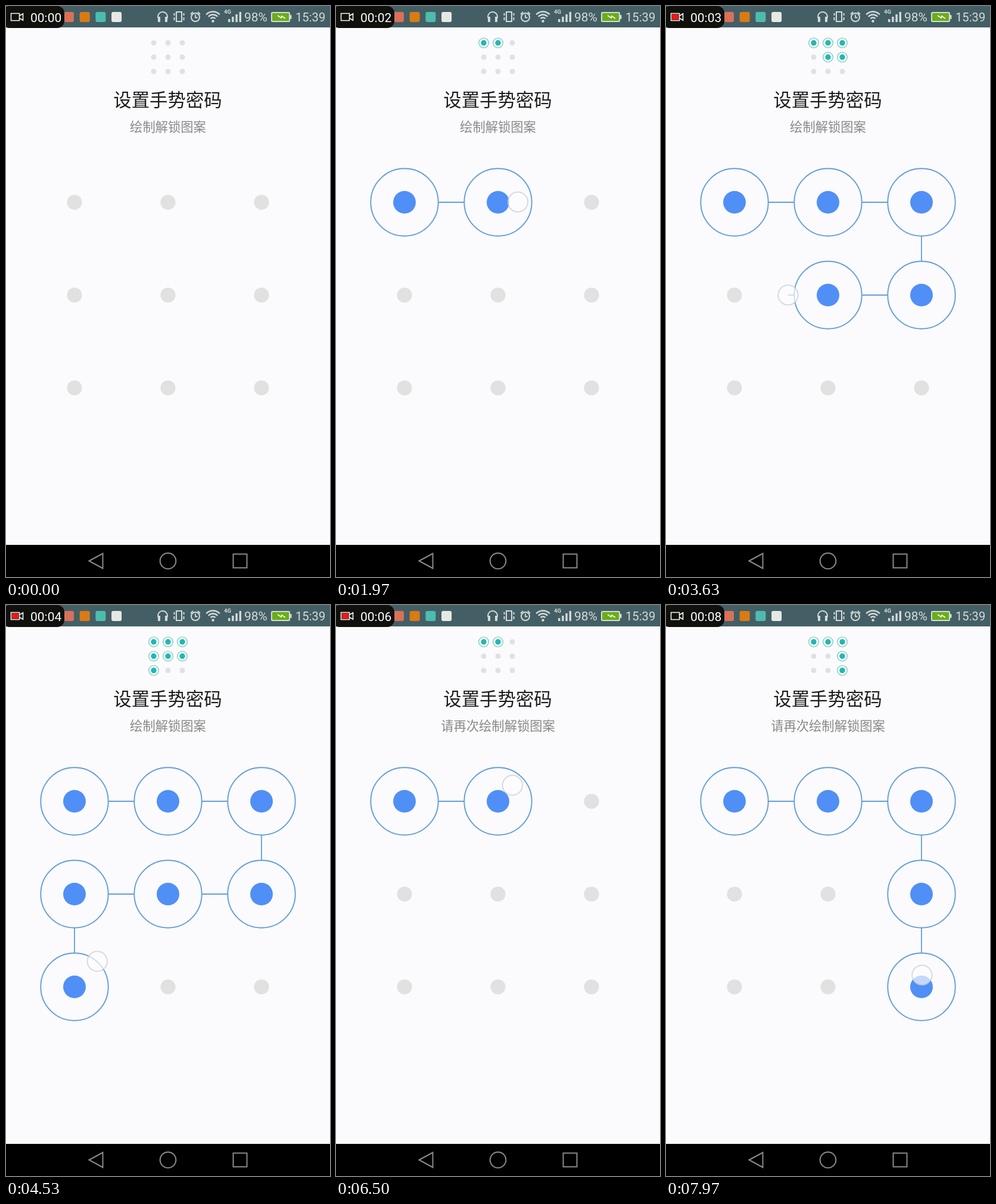
Write an HTML page with a canvas that moves like this. It is 544 px wide and 960 px high and loops after 8000 ms.

```html
<!DOCTYPE html>
<html lang="zh-CN">
<head>
<meta charset="utf-8">
<style>
  html, body { margin: 0; width: 100%; height: 100%; overflow: hidden; background: #fbfbfd; }
  canvas { display: block; }
</style>
</head>
<body>
<canvas id="stage" width="544" height="960"></canvas>
<script>
const ctx = document.getElementById('stage').getContext('2d');
const LOOP = 8000, CLEAR = 5420, RING = 56.7, HIT = 60;
const LATIN = 'Roboto, sans-serif';
const CJK = '"Noto Sans CJK SC", "Noto Sans CJK", sans-serif';
const BAR = '#d5dad8', NAV = '#8a8a8a', LINE = '#639edb', IDLE = '#e1e1e1';

const nodes = Array.from({ length: 9 }, (_, i) => {
  const col = i % 3, row = Math.floor(i / 3);
  return { x: 115 + col * 157, y: 330 + row * 156, miniX: 248 + col * 24, miniY: 62 + row * 24 };
});

const key = (t, x, y) => ({ t, x, y });

// Turning points of the finger: an S over the whole grid, then a hook down the right side.
const strokes = [
  { end: CLEAR, path: [key(1170, 116, 333), key(1330, 118, 335), key(2380, 425, 326), key(2770, 426, 438),
    key(2950, 415, 486), key(3900, 122, 486), key(4530, 153, 599), key(5350, 426, 642)] },
  { end: LOOP, path: [key(5930, 115, 334), key(6500, 296, 303), key(6950, 425, 318), key(LOOP, 430, 631)] }
];

const distance = (a, b) => Math.hypot(a.x - b.x, a.y - b.y);

function fingerAt(path, t) {
  const i = path.findIndex(p => p.t > t);
  if (i < 1) return null;
  const a = path[i - 1], b = path[i], k = (t - a.t) / (b.t - a.t);
  return { x: a.x + (b.x - a.x) * k, y: a.y + (b.y - a.y) * k };
}

// Each node lights when the finger first comes near it.
for (const stroke of strokes) {
  stroke.hits = [];
  for (let t = stroke.path[0].t, finger; finger = fingerAt(stroke.path, t); t += 5)
    for (const node of nodes)
      if (distance(finger, node) < HIT && !stroke.hits.some(h => h.node === node))
        stroke.hits.push({ t, node });
}

function disc(x, y, r, color) {
  ctx.fillStyle = color;
  ctx.beginPath();
  ctx.arc(x, y, r, 0, 7);
  ctx.fill();
}

function arc(x, y, r, from, to, color, width) {
  ctx.strokeStyle = color;
  ctx.lineWidth = width;
  ctx.beginPath();
  ctx.arc(x, y, r, from * Math.PI, to * Math.PI);
  ctx.stroke();
}

const ring = (x, y, r, color, width) => arc(x, y, r, 0, 2, color, width);

function outline(d, color, width) {
  ctx.strokeStyle = color;
  ctx.lineWidth = width;
  ctx.stroke(new Path2D(d));
}

function box(x, y, w, h, r, color) {
  ctx.fillStyle = color;
  ctx.beginPath();
  ctx.roundRect(x, y, w, h, r);
  ctx.fill();
}

function text(str, x, y, font, color, align = 'left') {
  ctx.font = font;
  ctx.fillStyle = color;
  ctx.textAlign = align;
  ctx.fillText(str, x, y);
}

// Line that leaves the ring around `from` and stops `gap` short of `to`.
function link(from, to, gap) {
  const d = distance(from, to);
  if (d <= RING + gap) return;
  const at = s => [from.x + (to.x - from.x) * s / d, from.y + (to.y - from.y) * s / d];
  ctx.strokeStyle = LINE;
  ctx.lineWidth = 1.8;
  ctx.beginPath();
  ctx.moveTo(...at(RING));
  ctx.lineTo(...at(d - gap));
  ctx.stroke();
}

function recorder(t) {
  const clock = t + 40;
  box(-6, 0, 104, 37, 12, '#10100d');
  if (clock % 1000 >= 350) box(10, 14, 11, 9, 0, '#f51414');
  outline('M8.5 12.5H22.5V24.5H8.5ZM22.5 16.5L28.5 13V24L22.5 20.5', '#f4f4f4', 1.6);
  text('00:0' + Math.floor(clock / 1000), 41, 26.5, '21px ' + LATIN, '#fff');
}

function statusBar(t) {
  box(0, 0, 544, 36, 0, '#435f65');
  ['#d97058', '#d97a14', '#4dbcae', '#e6e8e4'].forEach((color, i) =>
    box(97 + i * 26.7, 10, 17, 17, 3, color));
  recorder(t);

  // Headphones, vibration, alarm
  arc(263, 18, 8, 0.9, 2.1, BAR, 2);
  box(255, 18, 4, 9, 1, BAR);
  box(267, 18, 4, 9, 1, BAR);
  outline('M286 10H295V26H286ZM282.5 12V16M282.5 19V24M298.5 12V16M298.5 19V24', BAR, 2);
  ring(318, 19, 7, BAR, 2);
  outline('M318 14.5V19.5H321.5M310 14L314 10M326 14L322 10', BAR, 1.8);

  // Wi-Fi and mobile signal
  for (let r = 5.5; r < 16; r += 5) arc(347.5, 25, r, 1.24, 1.76, BAR, 2.4);
  disc(347.5, 25.5, 2.2, BAR);
  text('4G', 366, 13, 'bold 9.5px ' + LATIN, BAR);
  for (let i = 0; i < 4; i++) box(373 + i * 6.2, 22 - i * 4, 3.4, 5 + i * 4, 0, BAR);

  text('98%', 400, 26, '21px ' + LATIN, BAR);
  box(445, 10, 32, 17, 2.5, BAR);
  box(477, 15, 2.5, 7, 1, BAR);
  box(447, 12, 28, 13, 1, '#69ad18');
  outline('M456 16L462 20L463 17L469 21', '#eef4e4', 2);
  text('15:39', 486, 26, '20.2px ' + LATIN, BAR);
}

function navBar() {
  box(0, 906, 544, 54, 0, '#000');
  outline('M139.5 933L162.5 920.5V945.5Z', NAV, 2);
  ring(272, 933, 13.3, NAV, 2);
  outline('M381.5 921.5H404.5V944.5H381.5Z', NAV, 2);
}

function lockPattern(t) {
  const stroke = strokes.find(s => t >= s.path[0].t && t < s.end);
  const active = stroke ? stroke.hits.filter(h => h.t <= t).map(h => h.node) : [];
  const finger = stroke && fingerAt(stroke.path, t);

  for (const node of nodes) {
    const { x, y, miniX, miniY } = node;
    if (active.includes(node)) {
      ring(x, y, RING, LINE, 1.9);
      disc(x, y, 19, '#508ff6');
      ring(miniX, miniY, 8.3, '#5cc5b4', 1.1);
      disc(miniX, miniY, 4.7, '#25b6b0');
    } else {
      disc(x, y, 12.6, IDLE);
      disc(miniX, miniY, 4.5, IDLE);
    }
  }
  active.forEach((node, i) => i && link(active[i - 1], node, RING));

  if (finger) {
    if (active.length) link(active[active.length - 1], finger, 0);
    disc(finger.x, finger.y, 16.5, 'rgba(253,253,255,0.66)');
    ring(finger.x, finger.y, 16.7, 'rgba(200,200,204,0.65)', 2);
  }
}

function draw() {
  const t = performance.now() % LOOP;
  box(0, 0, 544, 960, 0, '#fbfbfd');
  text('设置手势密码', 271.5, 169, '500 30.4px ' + CJK, '#1c1c1c', 'center');
  text(t < CLEAR ? '绘制解锁图案' : '请再次绘制解锁图案', 272, 211, '21.3px ' + CJK, '#888', 'center');
  lockPattern(t);
  statusBar(t);
  navBar();
  requestAnimationFrame(draw);
}

draw();
</script>
</body>
</html>
```
